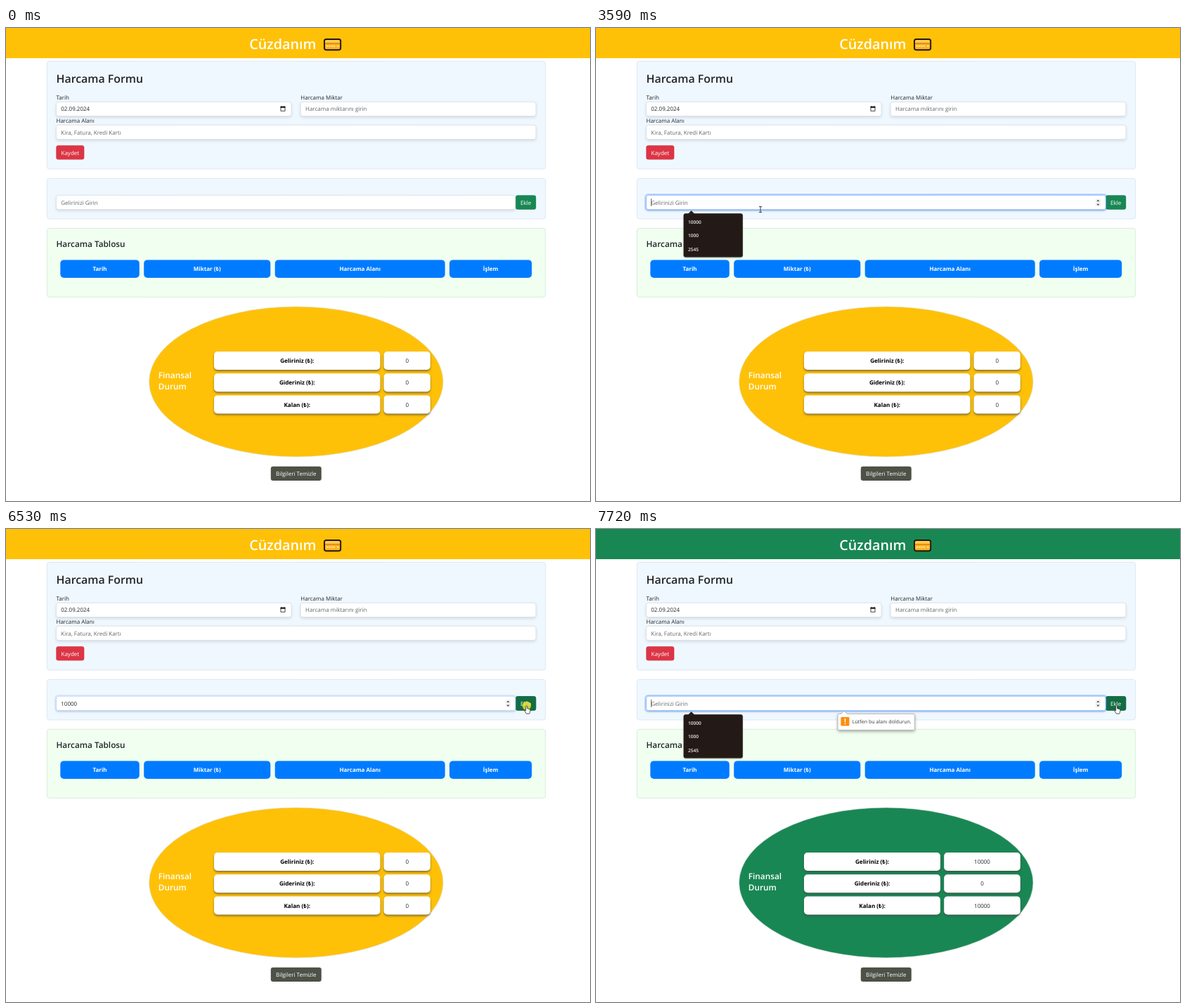
Write an HTML page with a canvas that moves like this. It is 831 px wide and 674 px high and loops after 8 s.

```html
<!DOCTYPE html>
<html lang="tr">
<head>
<meta charset="utf-8">
<title>Cüzdanım</title>
<style>
html, body { margin: 0; width: 100%; height: 100%; overflow: hidden; background: #fff; }
canvas { display: block; width: 831px; height: 674px; }
</style>
</head>
<body>
<canvas id="stage" width="831" height="674"></canvas>
<script>
const c = document.getElementById('stage').getContext('2d');
const LOOP = 8000;
const INK = '#212529', HINT = '#62676c', AMBER = '#ffc107', GREEN = '#198754';
const FOCUS = 2530, PRESS = 6460, ADD = 6570, BLINK = 530;

// pointer path: time, x, y
const path = [
  [390, 797.5, 668], [1140, 524.5, 276.5], [1420, 406, 235.5],
  [1690, 335, 222.5], [1970, 281.5, 229.5], [2310, 273.5, 244], [2850, 273.5, 244],
  [3050, 234, 258.6], [5530, 234, 258.6], [5740, 480, 276.5], [5920, 721, 245.5],
  [5990, 721, 245.5], [6260, 740.7, 251.8]
];
// typed text: time, value
const typed = [[0, ''], [3660, '1'], [4060, '10'], [4530, '100'], [4730, '1000'], [4870, '10000'], [ADD, '']];

const clamp = v => Math.max(0, Math.min(1, v));
const ramp = (t, a, b) => clamp((t - a) / (b - a));
const ease = u => u * u * (3 - 2 * u);
const within = (t, a, b) => t >= a && t < b;

const speed = (i, k) => (path[i + 1][k] - path[i][k]) / (path[i + 1][0] - path[i][0]);

// the pointer enters at full speed and ends at rest
function slope(i, k) {
  if (i === 0) return 1.5 * speed(0, k) - 0.5 * slope(1, k);
  if (i === path.length - 1) return 0;
  const s = speed(i - 1, k), r = speed(i, k);
  return s * r <= 0 ? 0 : 2 * s * r / (s + r);
}

// monotone cubic through the path points
function pointer(t) {
  const n = path.length - 1;
  if (t <= path[0][0]) return path[0].slice(1);
  if (t >= path[n][0]) return path[n].slice(1);
  let i = 0;
  while (path[i + 1][0] <= t) i++;
  const a = path[i], b = path[i + 1], h = b[0] - a[0], u = (t - a[0]) / h, v = 1 - u;
  return [1, 2].map(k =>
    a[k] * (1 + 2 * u) * v * v + h * slope(i, k) * u * v * v +
    b[k] * u * u * (3 - 2 * u) - h * slope(i + 1, k) * u * u * v);
}

const inField = ([x, y]) => x > 71 && x < 725 && y > 238 && y < 259.5;
const onButton = ([x, y]) => x >= 725 && x < 754 && y > 238 && y < 259;

function text(s, x, y, size = 8, color = INK, weight = 400, align = 'left') {
  c.font = `${weight} ${size}px "Open Sans", "Noto Sans", sans-serif`;
  c.textAlign = align;
  c.fillStyle = color;
  c.fillText(s, x, y);
}

function box(x, y, x2, y2, r, fill, line, shade) {
  c.save();
  c.beginPath();
  c.roundRect(x, y, x2 - x, y2 - y, r);
  if (shade) [c.shadowOffsetY, c.shadowBlur, c.shadowColor] = shade;
  c.fillStyle = fill;
  c.fill();
  c.restore();
  if (line) {
    c.beginPath();
    c.roundRect(x, y, x2 - x, y2 - y, r);
    c.lineWidth = 0.8;
    c.strokeStyle = line;
    c.stroke();
  }
}

function shape(points, fill, line, width) {
  c.beginPath();
  points.forEach(([x, y]) => c.lineTo(x, y));
  c.closePath();
  c.fillStyle = fill;
  c.fill();
  if (line) {
    c.lineWidth = width;
    c.lineJoin = 'round';
    c.strokeStyle = line;
    c.stroke();
  }
}

function disc(x, y, r, fill) {
  c.beginPath();
  c.arc(x, y, r, 0, 7);
  c.fillStyle = fill;
  c.fill();
}

const field = (x, y, x2) => box(x, y, x2, y + 20.3, 3, '#fff', '#d9dee4', [2, 4, 'rgba(0,0,0,.13)']);
const panel = (y, y2, fill, line) => box(58.3, y, 767.7, y2, 3.5, fill, line);

function card() {
  box(453, 16, 476.2, 31.2, 2.6, '#ffb320');
  c.fillStyle = '#ffc94d';
  c.fillRect(454, 17, 21.2, 4);
  c.fillStyle = '#e08a12';
  c.fillRect(454, 21, 21.2, 1.8);
  c.fillStyle = '#fff1c9';
  for (let i = 0; i < 4; i++) c.fillRect(456 + i * 3.2, 25, 2.3, 1.5);
  c.fillRect(471, 25, 2.6, 1.5);
  c.beginPath();
  c.roundRect(453, 16, 23.2, 15.2, 2.6);
  c.lineWidth = 1.9;
  c.strokeStyle = '#21170a';
  c.stroke();
}

function calendar() {
  c.fillStyle = '#1c1c1c';
  c.fillRect(390.6, 111.8, 6.8, 2);
  c.fillRect(391.6, 111, 1, 1);
  c.fillRect(395.4, 111, 1, 1);
  c.lineWidth = 0.8;
  c.strokeStyle = '#1c1c1c';
  c.strokeRect(391, 112.2, 6, 6);
}

function form() {
  panel(47.4, 201, '#f0f8ff', '#d6e2ee');
  text('Harcama Formu', 71.5, 78, 15.9, INK, 600);
  text('Tarih', 71.5, 101.7);
  text('Harcama Miktar', 419.3, 101.7);
  text('Harcama Alanı', 71.5, 135);
  field(71.5, 105.2, 406);
  field(419.2, 105.2, 754);
  field(71.5, 138.3, 754);
  text('02.09.2024', 78.3, 118.3);
  calendar();
  text('Harcama miktarını girin', 426, 118.3, 8, HINT);
  text('Kira, Fatura, Kredi Kartı', 78.3, 151.5, 8, HINT);
  box(71.3, 167.3, 111.3, 187.6, 3.3, '#dc3545');
  text('Kaydet', 91.3, 180.7, 8, '#fff', 400, 'center');
}

function spinner() {
  c.fillStyle = '#f1f1f1';
  c.fillRect(710.6, 243.2, 7.6, 11);
  shape([[712.4, 247], [716.4, 247], [714.4, 244.8]], '#444');
  shape([[712.4, 250.8], [716.4, 250.8], [714.4, 253]], '#444');
}

// the blink restarts with each key and each focus
function caretOn(t) {
  if (t < FOCUS || within(t, PRESS, ADD)) return false;
  const from = Math.max(FOCUS, ...typed.map(k => k[0]).filter(at => at <= t));
  return Math.floor((t - from) / BLINK) % 2 === 0;
}

function focusAmount(t) {
  if (t < PRESS) return ramp(t, FOCUS, FOCUS + 150);
  return t < ADD ? 1 - ramp(t, PRESS, ADD) : ramp(t, ADD + 20, ADD + 170);
}

function addButton(t) {
  box(725.2, 238.2, 754.2, 258.7, 3.3, GREEN);
  c.globalAlpha = onButton(pointer(t)) ? ramp(t, 6080, 6230) : 0;
  box(725.2, 238.2, 754.2, 258.7, 3.3, '#146c43');
  c.globalAlpha = 1;
  text('Ekle', 739.6, 251.6, 8, '#fff', 400, 'center');
}

function income(t) {
  panel(214.4, 272, '#f0f8ff', '#d6e2ee');
  field(71.5, 238.3, 725);
  addButton(t);
  const glow = focusAmount(t);
  if (glow) {
    c.globalAlpha = glow;
    c.beginPath();
    c.roundRect(70.2, 237, 656.4, 22.9, 4);
    c.lineWidth = 2.1;
    c.strokeStyle = 'rgba(13,110,253,.25)';
    c.stroke();
    box(71.5, 238.3, 725.3, 258.6, 3, '#fff', '#86b7fe');
    c.globalAlpha = 1;
  }
  const value = typed.filter(([at]) => at <= t).pop()[1];
  text(value || 'Gelirinizi Girin', 78.3, 251.6, 8, value ? INK : HINT);
  if (caretOn(t)) {
    const x = 78.4 + (value ? c.measureText(value).width : 0);
    c.fillStyle = INK;
    c.fillRect(x, 243, 0.7, 11);
  }
  if (t >= FOCUS || (t > 450 && inField(pointer(t - 60)))) spinner();
}

function table() {
  panel(285.4, 383.4, '#f0fff0', '#d2e8d8');
  text('Harcama Tablosu', 71.5, 311.6, 11.8, INK, 600);
  [['Tarih', 77.3, 189.8], ['Miktar (₺)', 196.2, 376.3],
   ['Harcama Alanı', 382.7, 624.7], ['İşlem', 631, 748.2]].forEach(([s, x, x2]) => {
    box(x, 330.4, x2, 356, 5, '#007bff');
    text(s, (x + x2) / 2, 346.4, 8, '#fff', 700, 'center');
  });
}

function summary(added, theme) {
  c.beginPath();
  c.ellipse(412.8, 504, 209.2, 107, 0, 0, 7);
  c.fillStyle = theme;
  c.fill();
  c.lineWidth = 0.6;
  c.strokeStyle = '#dee2e6';
  c.stroke();
  text('Finansal', 216.8, 499, 11.8, '#fff', 600);
  text('Durum', 216.8, 514.5, 11.8, '#fff', 600);
  const split = added ? 490 : 532.4, sum = added ? '10000' : '0';
  const shade = [2, 3, 'rgba(70,70,70,.65)'];
  [['Geliriniz (₺):', sum], ['Gideriniz (₺):', '0'], ['Kalan (₺):', sum]].forEach(([s, n], i) => {
    const y = 461 + i * 31.2;
    box(296, y, split, y + 26, 5, '#fff', null, shade);
    box(split + 5.2, y, 603.8, y + 26, 5, '#fff', null, shade);
    text(s, (296 + split) / 2, y + 16.2, 8.1, '#000', 700, 'center');
    text(n, (split + 609) / 2, y + 16.2, 8, INK, 400, 'center');
  });
}

function suggestions(t) {
  if (!within(t, 2640, 5060) && t < ADD) return;
  const rows = within(t, 3700, 5060) ? 2 : 3;
  c.globalAlpha = t < 5060 ? 1 - ramp(t, 4870, 5060) : 1;
  box(124.6, 264.2, 208.8, 268.4 + rows * 19.4, 3, '#231a18', null, [1, 2, 'rgba(0,0,0,.3)']);
  shape([[131, 264.8], [135.6, 260.2], [140.2, 264.8]], '#231a18');
  ['10000', '1000', '2545'].slice(0, rows).forEach((s, i) =>
    text(s, 131, 278.6 + i * 19.5, 6.6, '#f4efec', 600));
  c.globalAlpha = 1;
}

// the empty bubble fades in first, then its message
function bubble(t) {
  const show = ease(ramp(t, 6640, 7200));
  if (!show) return;
  c.globalAlpha = show;
  box(344, 263.4, 453.6, 286.6, 1.5, '#fff', '#a8a8a8', [2, 4, 'rgba(0,0,0,.35)']);
  shape([[348.6, 264], [353, 259.4], [357.4, 264]], '#fff');
  c.beginPath();
  c.moveTo(348.6, 263.4);
  c.lineTo(353, 259.2);
  c.lineTo(357.4, 263.4);
  c.lineWidth = 0.8;
  c.strokeStyle = '#a8a8a8';
  c.stroke();
  c.globalAlpha = ease(ramp(t, 7200, 7700));
  box(348.4, 268, 360.4, 280.4, 1.2, '#ff8c0a');
  c.fillStyle = '#fff';
  c.fillRect(353.7, 270, 1.5, 5.4);
  c.fillRect(353.7, 276.6, 1.5, 1.6);
  text('Lütfen bu alanı doldurun.', 364.8, 277.3, 7.1, '#3c3c3c');
  c.globalAlpha = 1;
}

const arrow = [[0, 0], [0, 8.8], [2, 6.9], [3.3, 9.8], [4.6, 9.2], [3.3, 6.5], [6, 6.3]];
const hand = [[-1, .6], [0, -.3], [1, .6], [1, 4], [4.8, 5], [5.4, 6.2], [4.8, 9.4],
  [4, 11.4], [-.2, 11.4], [-3, 7.2], [-2.5, 6.2], [-1, 7.2]];

function cursor(t) {
  if (t < path[0][0]) return;
  const p = pointer(t), [x, y] = p;
  if (within(t, 2500, 2640) || within(t, PRESS, 6590)) disc(x + .2, y, 6.2, 'rgba(255,240,40,.75)');
  c.save();
  c.translate(x, y);
  if (inField(p)) {
    c.lineWidth = 0.9;
    c.strokeStyle = '#2b2b2b';
    c.beginPath();
    c.moveTo(-2, -4);
    c.lineTo(2, -4);
    c.moveTo(0, -4);
    c.lineTo(0, 4);
    c.moveTo(-2, 4);
    c.lineTo(2, 4);
    c.stroke();
  } else {
    shape(onButton(p) ? hand : arrow, '#fff', '#262626', 0.8);
  }
  c.restore();
}

function draw(t) {
  const added = t >= ADD, theme = added ? GREEN : AMBER;
  c.fillStyle = '#fff';
  c.fillRect(0, 0, 831, 674);
  c.fillStyle = theme;
  c.fillRect(0, 0, 831, 43);
  text('Cüzdanım', 346.2, 30, 19.8, '#fff', 600);
  card();
  form();
  income(t);
  table();
  summary(added, theme);
  box(376.8, 624.7, 448.8, 645, 3.3, '#4d5146');
  text('Bilgileri Temizle', 412.8, 637.9, 8, '#fff', 400, 'center');
  suggestions(t);
  bubble(t);
  cursor(t);
}

c.textRendering = 'geometricPrecision';
const start = performance.now();
function tick() {
  draw((performance.now() - start) % LOOP);
  requestAnimationFrame(tick);
}
tick();
</script>
</body>
</html>
```
